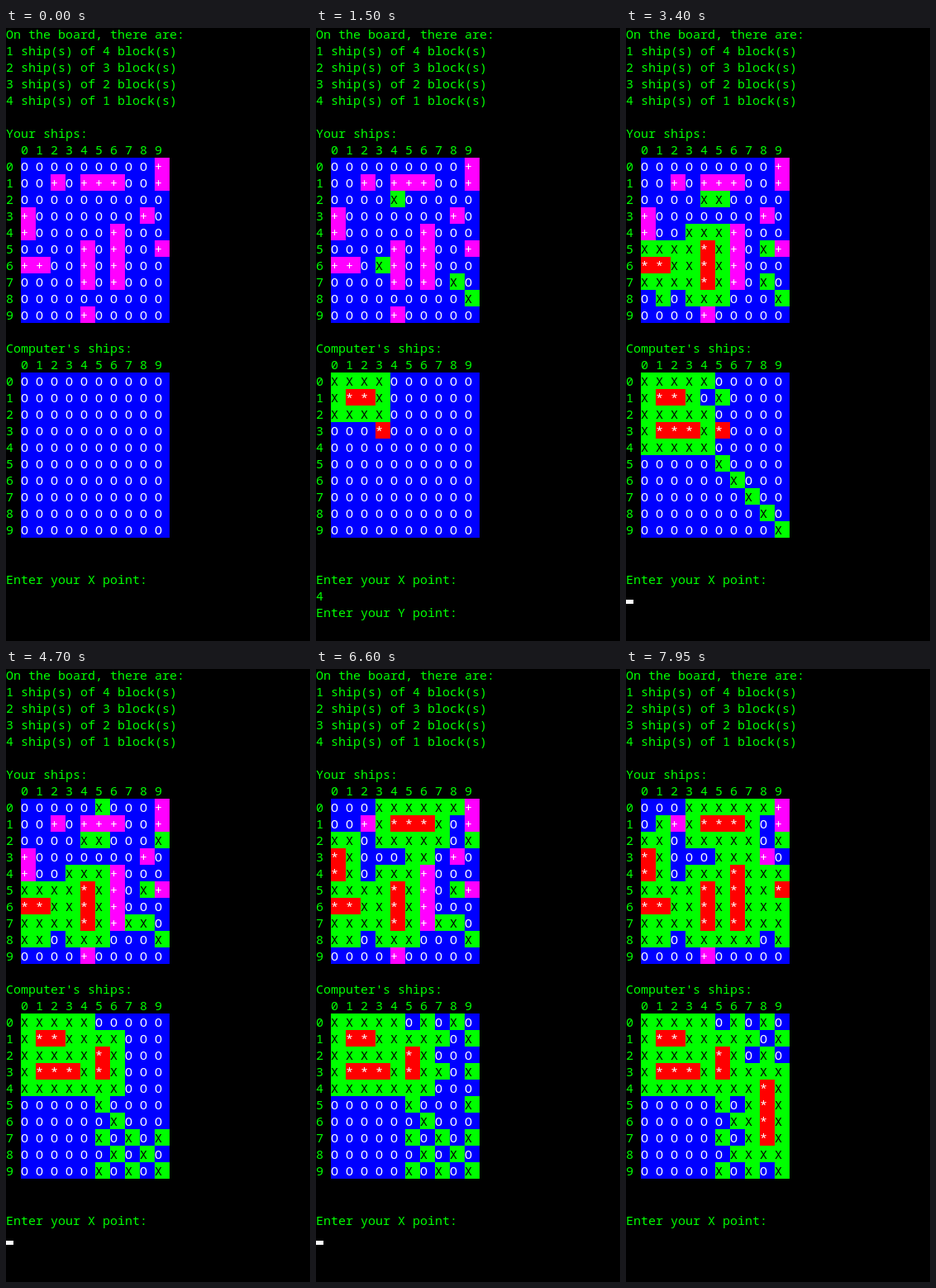
An HTML page with a canvas that plays this animation: 368x742 px, repeating every 8000 ms.

```html
<!DOCTYPE html>
<html lang="en">
<head>
<meta charset="utf-8">
<title>Battleship console</title>
<style>
  html, body { margin: 0; width: 100%; height: 100%; overflow: hidden; background: #000; }
  canvas { display: block; width: 368px; height: 742px; }
</style>
</head>
<body>
<canvas id="screen" width="368" height="742"></canvas>
<script>
const ctx = document.getElementById('screen').getContext('2d');
const LOOP = 8000, STEP = 50, CHAR = 9, LINE = 20, TOP = -3;
const GREEN = '#00ff00', WHITE = '#ffffff';
const STYLE = {
  'O': ['#0000ff', WHITE],
  '+': ['#ff00ff', WHITE],
  'X': [GREEN, '#000000'],
  '*': ['#ff0000', WHITE]
};

// Ships as row, column, length, direction (h or v).
const PLAYER = '092v 121h 143h 302v 381h 464v 543v 591h 602h 941h';
const COMPUTER = '112h 313h 252v 484v';

// Each turn: steps it takes, the user's shot, then the computer's replies (row, column).
const TURNS = `
  4 00 24|4 11|4 01 78|4 10 63|4 21 89|4 12|4 33|4 34 58
  3 32|3 31|3 55 25|3 66 52|3 77 81|2 88 72|3 99 74 64 84
  3 04 54 71|6 15 61 60|6 35
  4 25|4 75 05|4 86 77|4 97 80|5 95 29|5 79
  5 06 08|5 08 35|5 17 36|6 19 15 16 27|6 37 14|5 39 30 20|6 59 40
  4 28 46 47|3 48|3 49 56 66 76 79|3 58|3 47 59 11|3 68|3 78
  9 00`.trim().split(/[|\n]/).map(line => {
    const [steps, shot, ...replies] = line.trim().split(' ');
    return { steps: +steps, shot, replies };
  });

function makeBoard(spec, visible) {
  const cells = Array.from({ length: 10 }, () => Array(10).fill('O'));
  const ships = spec.split(' ').map(s => {
    const [r, c, n] = [+s[0], +s[1], +s[2]];
    return Array.from({ length: n }, (_, i) => s[3] === 'h' ? [r, c + i] : [r + i, c]);
  });
  if (visible) ships.flat().forEach(([r, c]) => cells[r][c] = '+');
  return { cells, ships };
}

function fire({ cells, ships }, shot) {
  const row = +shot[0], col = +shot[1];
  const ship = ships.find(s => s.some(([r, c]) => r === row && c === col));
  cells[row][col] = ship ? '*' : 'X';
  if (!ship || ship.some(([r, c]) => cells[r][c] !== '*')) return;
  // A sunk ship reveals the water around it.
  for (const [r, c] of ship)
    for (let y = r - 1; y <= r + 1; y++)
      for (let x = c - 1; x <= c + 1; x++)
        if (cells[y] && cells[y][x] && cells[y][x] !== '*') cells[y][x] = 'X';
}

function stateAt(step) {
  const own = makeBoard(PLAYER, true), enemy = makeBoard(COMPUTER, false);
  let start = 0, i = 0;
  while (i < TURNS.length - 1 && step >= start + TURNS[i].steps) {
    const turn = TURNS[i++];
    fire(enemy, turn.shot);
    turn.replies.forEach(s => fire(own, s));
    start += turn.steps;
  }
  const last = i === TURNS.length - 1;
  const { steps, shot } = TURNS[i];
  const half = Math.floor(steps / 2), k = step - start;
  const typed = !last && k >= half;
  const opening = i === 0 && !typed;
  return {
    own, enemy,
    digit: typed ? shot[1] : null,
    cursor: !opening && (typed ? k - half : k) % 2 === 1
  };
}

function print(text, line, x = 0, color = GREEN) {
  ctx.fillStyle = color;
  ctx.fillText(text, x, TOP + LINE * line + 16);
}

function drawBoard(title, { cells }, line) {
  print(title, line);
  print('  0 1 2 3 4 5 6 7 8 9', line + 1);
  cells.forEach((row, r) => {
    const y = line + 2 + r;
    print(String(r), y);
    row.forEach((mark, c) => {
      const x = 2 * CHAR * (c + 1);
      ctx.fillStyle = STYLE[mark][0];
      ctx.fillRect(x, TOP + LINE * y, 2 * CHAR, LINE);
      print(mark, y, x, STYLE[mark][1]);
    });
  });
}

function draw(step) {
  const { own, enemy, digit, cursor } = stateAt(step);
  ctx.fillStyle = '#000';
  ctx.fillRect(0, 0, 368, 742);
  ctx.font = '15px "Noto Sans Mono", "DejaVu Sans Mono", monospace';
  print('On the board, there are:', 0);
  for (let n = 1; n <= 4; n++) print(`${n} ship(s) of ${5 - n} block(s)`, n);
  drawBoard('Your ships:', own, 6);
  drawBoard("Computer's ships:", enemy, 19);
  print('Enter your X point:', 33);
  if (digit !== null) {
    print(digit, 34);
    print('Enter your Y point:', 35);
  }
  if (cursor) {
    ctx.fillStyle = WHITE;
    ctx.fillRect(0, TOP + LINE * (digit !== null ? 36 : 34) + 15, CHAR, 5);
  }
}

const began = performance.now();
function tick() {
  draw(Math.floor((performance.now() - began) % LOOP / STEP));
  requestAnimationFrame(tick);
}
tick();
</script>
</body>
</html>
```
